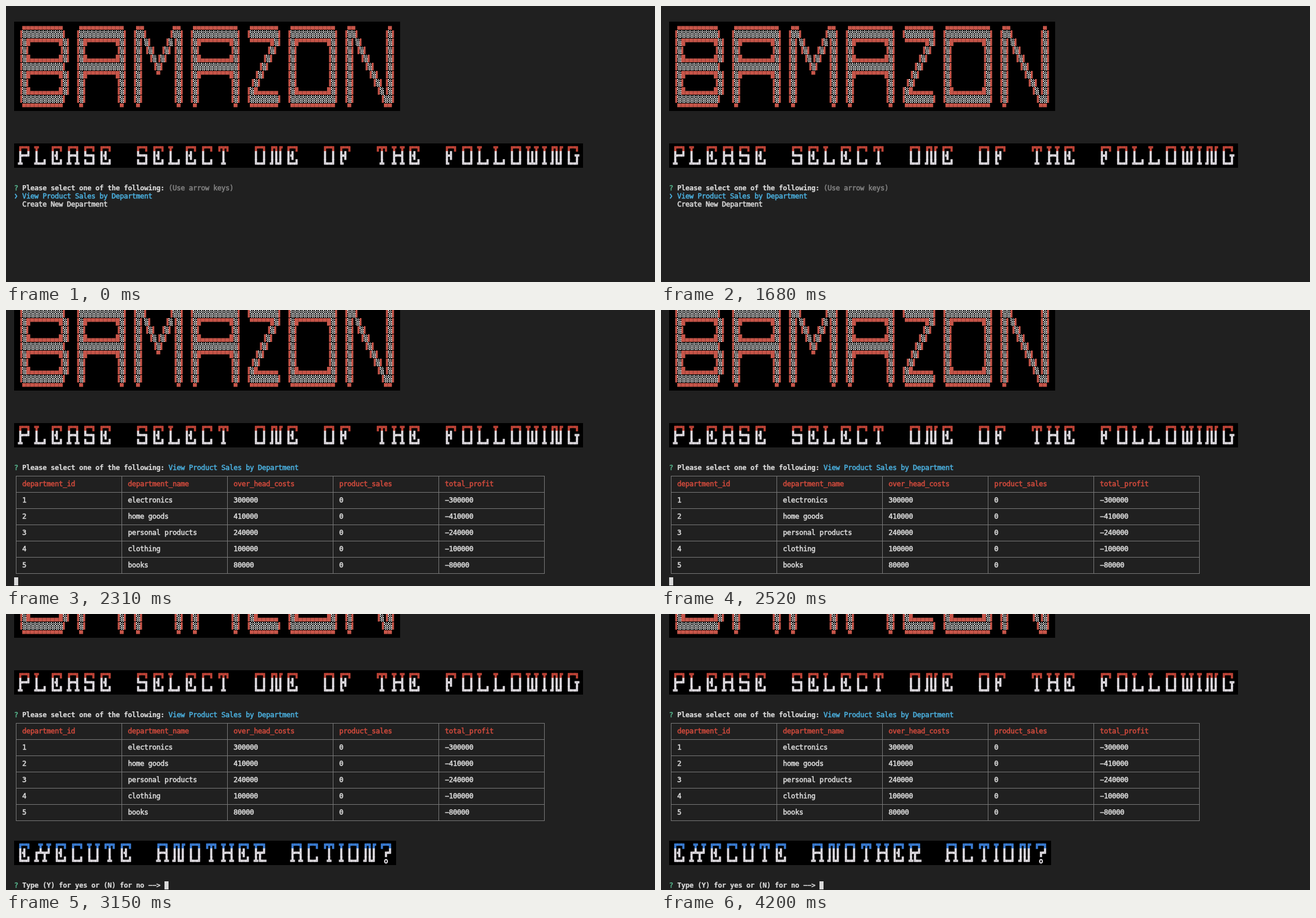
Write an HTML page with a canvas that moves like this. It is 1118x476 px and loops after 4270 ms.

```html
<!DOCTYPE html>
<html lang="en">
<head>
<meta charset="utf-8">
<title>Terminal session</title>
<style>
  html, body { margin: 0; width: 100%; height: 100%; overflow: hidden; background: #202020; }
  canvas { display: block; }
</style>
</head>
<body>
<canvas id="stage" width="1118" height="476"></canvas>
<script>
const ctx = document.getElementById('stage').getContext('2d');
const CELL_W = 7, CELL_H = 14, LEFT = 14, LOOP = 4270;
const SELECT_AT = 1820, TABLE_AT = 2310, CONFIRM_AT = 2590;
const BG = '#202020', WHITE = '#dadada', RED = '#cf4a3c', BLOCK_RED = '#c65549',
      CYAN = '#4bb0df', GREEN = '#56b48c', GRAY = '#828282', BLUE = '#3f86e4', LINE = '#787878';

const colX = col => LEFT + col * CELL_W;
const rowY = row => row * CELL_H - 1;

// The outline thickens the thin regular weight
function text(str, col, row, color, bold = false, outline = bold ? 0.2 : 0.55) {
  ctx.font = `${bold ? 'bold ' : ''}12px "DejaVu Sans Mono", monospace`;
  ctx.fillStyle = ctx.strokeStyle = color;
  ctx.lineWidth = outline;
  [...str].forEach((ch, i) => {
    if (ch === ' ') return;
    const x = colX(col + i), y = rowY(row) + 11;
    ctx.fillText(ch, x, y);
    ctx.strokeText(ch, x, y);
  });
}

function band(row, cols, rows) {
  ctx.fillStyle = '#000';
  ctx.fillRect(LEFT, rowY(row), cols * CELL_W, rows * CELL_H);
}

// Large shaded letters
const times = (n, line) => Array(n).fill(line);
const BOWL = ['▐░█▀▀▀▀▀▀▀█░▌', '▐░▌       ▐░▌', '▐░█▄▄▄▄▄▄▄█░▌'];
const BIG = {
  B: [' ▄▄▄▄▄▄▄▄▄▄  ', '▐░░░░░░░░░░▌ ', ...BOWL, '▐░░░░░░░░░░▌ ', ...BOWL,
      '▐░░░░░░░░░░▌ ', ' ▀▀▀▀▀▀▀▀▀▀  '],
  A: [' ▄▄▄▄▄▄▄▄▄▄▄ ', '▐░░░░░░░░░░░▌', ...BOWL, '▐░░░░░░░░░░░▌', BOWL[0],
      ...times(3, BOWL[1]), ' ▀         ▀ '],
  M: [' ▄▄       ▄▄ ', '▐░░▌     ▐░░▌', '▐░▌░▌   ▐░▐░▌', '▐░▌▐░▌ ▐░▌▐░▌',
      '▐░▌ ▐░▐░▌ ▐░▌', '▐░▌  ▐░▌  ▐░▌', '▐░▌   ▀   ▐░▌', ...times(3, BOWL[1]),
      ' ▀         ▀ '],
  Z: [' ▄▄▄▄▄▄▄ ', '▐░░░░░░░▌', ' ▀▀▀▀▀█░▌',
      ...[5, 4, 3, 2, 1].map(n => (' '.repeat(n) + '▐░▌').padEnd(9)),
      '▐░█▄▄▄▄▄ ', '▐░░░░░░░▌', ' ▀▀▀▀▀▀▀ '],
  O: [' ▄▄▄▄▄▄▄▄▄▄▄ ', '▐░░░░░░░░░░░▌', BOWL[0], ...times(5, BOWL[1]), BOWL[2],
      '▐░░░░░░░░░░░▌', ' ▀▀▀▀▀▀▀▀▀▀▀ '],
  N: [' ▄▄        ▄ ', '▐░░▌      ▐░▌', '▐░▌░▌     ▐░▌',
      ...[0, 1, 2, 3, 4].map(n => '▐░▌' + ' '.repeat(n) + '▐░▌' + ' '.repeat(4 - n) + '▐░▌'),
      '▐░▌     ▐░▐░▌', '▐░▌      ▐░░▌', ' ▀        ▀▀ ']
};
// Part of the glyph box covered: x, y, width, height
const BLOCKS = { '▄': [0, .5, 1, .5], '▀': [0, 0, 1, .5], '█': [0, 0, 1, 1],
                 '▐': [.5, 0, .5, 1], '▌': [0, 0, .5, 1] };
const GLYPH_W = 6.75, GLYPH_H = 13;

// Checkerboard of 4 by 8 dots, snapped to whole pixels
function shade(x, y) {
  const edgeX = i => Math.round(i * CELL_W / 4), edgeY = i => Math.round(i * GLYPH_H / 8);
  ctx.fillStyle = '#e2e2e2';
  for (let i = 0; i < 32; i++) {
    const dx = i % 4, dy = i >> 2;
    if ((dx + dy) % 2 === 0)
      ctx.fillRect(x + edgeX(dx), y + edgeY(dy), edgeX(dx + 1) - edgeX(dx), edgeY(dy + 1) - edgeY(dy));
  }
}

function bigTitle(word, row) {
  band(row, 95, 11);
  let col = 1;
  for (const letter of word) {
    BIG[letter].forEach((line, r) => [...line].forEach((ch, c) => {
      const x = colX(col + c), y = rowY(row + r) + CELL_H - GLYPH_H;
      if (ch === '░') return shade(x, y);
      if (ch === ' ') return;
      const [bx, by, bw, bh] = BLOCKS[ch];
      ctx.fillStyle = BLOCK_RED;
      ctx.fillRect(x + bx * CELL_W, y + by * GLYPH_H, bw * GLYPH_W, bh * GLYPH_H);
    }));
    col += BIG[letter][0].length + 1;
  }
}

// Three-row letters made of double lines
const CHROME = {
  A: '╔═╗|╠═╣|╩ ╩', C: '╔═╗|║  |╚═╝', E: '╔═╗|║╣ |╚═╝', F: '╔═╗|╠╣ |╚  ',
  G: '╔═╗|║ ╦|╚═╝', H: '╦ ╦|╠═╣|╩ ╩', I: '╦|║|╩', L: '╦  |║  |╩═╝',
  N: '╔╗╔|║║║|╝╚╝', O: '╔═╗|║ ║|╚═╝', P: '╔═╗|╠═╝|╩  ', R: '╦═╗|╠╦╝|╩╚═',
  S: '╔═╗|╚═╗|╚═╝', T: '╔╦╗| ║ | ╩ ', U: '╦ ╦|║ ║|╚═╝', W: '╦ ╦|║║║|╚╩╝',
  X: ' ╦ ╦|╔╩╦╝|╩ ╩ ', '?': '╔═╗| ╔╝| o ', ' ': '    |    |    '
};

function chromeTitle(str, row, topColor) {
  const glyphs = [...str].map(ch => CHROME[ch].split('|'));
  band(row, 1 + glyphs.reduce((sum, g) => sum + g[0].length + 1, 0), 3);
  for (let r = 0; r < 3; r++)
    text(glyphs.map(g => g[r]).join(' '), 1, row + r, r ? '#eeeaf0' : topColor, false, 0.8);
}

const TABLE = [
  ['department_id', 'department_name', 'over_head_costs', 'product_sales', 'total_profit'],
  ['1', 'electronics', '300000', '0', '−300000'],
  ['2', 'home goods', '410000', '0', '−410000'],
  ['3', 'personal products', '240000', '0', '−240000'],
  ['4', 'clothing', '100000', '0', '−100000'],
  ['5', 'books', '80000', '0', '−80000']
];

function table(row) {
  const span = 26, x = colX(0) + 3, y = rowY(row) + 7;
  const width = 5 * span * CELL_W, height = TABLE.length * 2 * CELL_H;
  ctx.fillStyle = LINE;
  for (let i = 0; i <= 5; i++) ctx.fillRect(x + i * span * CELL_W, y, 1, height + 1);
  for (let i = 0; i <= TABLE.length; i++) ctx.fillRect(x, y + i * 2 * CELL_H, width + 1, 1);
  TABLE.forEach((cells, r) => cells.forEach((cell, c) =>
    text(cell, 2 + c * span, row + 1 + r * 2, r ? WHITE : RED)));
}

function question(str, row) {
  text('?', 0, row, GREEN);
  text(str, 2, row, WHITE, true);
}

function cursor(col, row) {
  ctx.fillStyle = WHITE;
  ctx.fillRect(colX(col), rowY(row), CELL_W, CELL_H);
}

function menu(row) {
  const x = LEFT + 1.7, y = rowY(row) + 7;
  ctx.strokeStyle = CYAN;
  ctx.lineWidth = 1.8;
  ctx.beginPath();
  ctx.moveTo(x, y - 4);
  ctx.lineTo(x + 2.8, y);
  ctx.lineTo(x, y + 4);
  ctx.stroke();
  text('View Product Sales by Department', 2, row, CYAN);
  text('Create New Department', 2, row + 1, WHITE);
}

function draw(t) {
  const scrolledRows = t < TABLE_AT ? 0 : t < CONFIRM_AT ? 3 : 10;
  ctx.fillStyle = BG;
  ctx.fillRect(0, 0, 1118, 476);
  ctx.save();
  ctx.translate(0, -scrolledRows * CELL_H);

  bigTitle('BAMAZON', 2);
  chromeTitle('PLEASE SELECT ONE OF THE FOLLOWING', 17, RED);
  question('Please select one of the following:', 22);

  if (t < SELECT_AT) {
    text('(Use arrow keys)', 38, 22, GRAY);
    menu(23);
  } else {
    text('View Product Sales by Department', 38, 22, CYAN);
    if (t >= TABLE_AT) table(23);
    if (t < TABLE_AT) cursor(0, 23);
    else if (t < CONFIRM_AT) cursor(0, 36);
    else {
      chromeTitle('EXECUTE ANOTHER ACTION?', 38, BLUE);
      question('Type (Y) for yes or (N) for no −−>', 43);
      cursor(37, 43);
    }
  }
  ctx.restore();
}

const start = performance.now();
function tick() {
  draw((performance.now() - start) % LOOP);
  requestAnimationFrame(tick);
}
tick();
</script>
</body>
</html>
```
